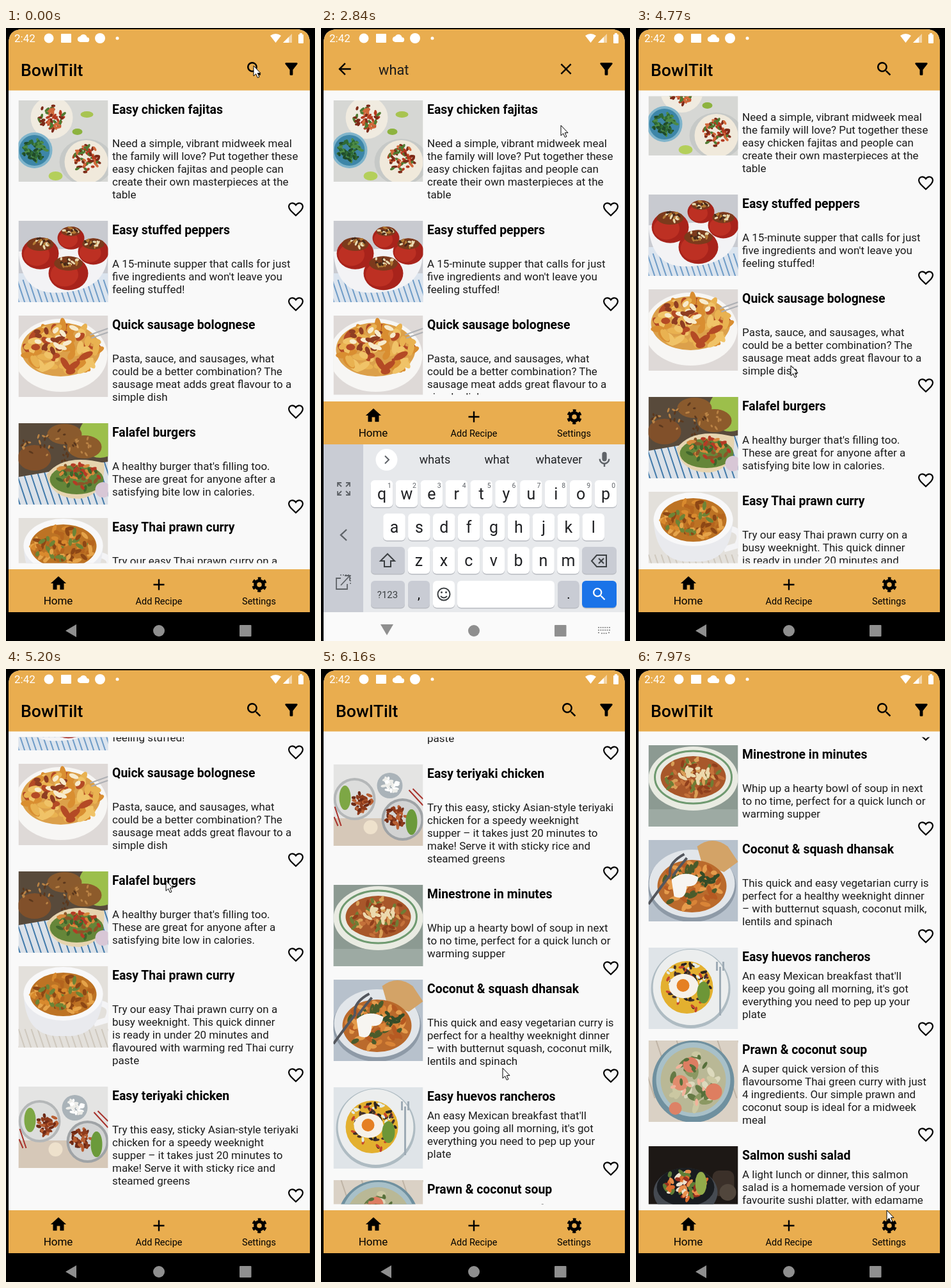
These frames come from a looping animation (483 px wide and 957 px high, 8 s). An HTML page:

```html
<!DOCTYPE html>
<html lang="en">
<head>
<meta charset="utf-8">
<title>Recipes</title>
<style>
html, body { margin: 0; width: 100%; height: 100%; overflow: hidden; background: #000; }
svg { display: block; font-family: Roboto, sans-serif; }
text { white-space: pre; }
</style>
</head>
<body>
<svg id="stage" width="483" height="957" viewBox="0 0 483 957"></svg>
<script>
const ORANGE = '#e9ad4f';
const ICONS = {
  search: 'M15.5 14h-.8l-.3-.3A6.5 6.5 0 1 0 13.7 14.4l.3.3v.8l5 5L20.5 19zm-6 0a4.5 4.5 0 1 1 0-9 4.5 4.5 0 0 1 0 9z',
  home: 'M10 20v-6h4v6h5v-8h3L12 3 2 12h3v8z',
  add: 'M19 13h-6v6h-2v-6H5v-2h6V5h2v6h6z',
  filter: 'M4.2 5.6 10 13v6q0 1 1 1h2q1 0 1-1v-6l5.8-7.4A1 1 0 0 0 19 4H5a1 1 0 0 0-.8 1.6z',
  back: 'M20 11H7.8l5.6-5.6L12 4l-8 8 8 8 1.4-1.4L7.8 13H20z',
  close: 'M19 6.4 17.6 5 12 10.6 6.4 5 5 6.4 10.6 12 5 17.6 6.4 19 12 13.4 17.6 19 19 17.6 13.4 12z',
  mic: 'M12 14a3 3 0 0 0 3-3V5a3 3 0 0 0-6 0v6a3 3 0 0 0 3 3zm5-3a5 5 0 0 1-10 0H5a7 7 0 0 0 6 6.9V21h2v-3.1A7 7 0 0 0 19 11z',
  cloud: 'M19.4 10A7.5 7.5 0 0 0 5.4 8 6 6 0 0 0 6 20h13a5 5 0 0 0 .4-10z',
  heart: 'M12 20C6 14.6 3 11.9 3 8.5 3 6 5 4 7.5 4c1.8 0 3.5 1 4.5 2.6C13 5 14.7 4 16.5 4 19 4 21 6 21 8.5c0 3.4-3 6.1-9 11.5z'
};

// SVG string helpers
const rect = (x, y, w, h, fill, r = 0) => `<rect x="${x}" y="${y}" width="${w}" height="${h}" rx="${r}" fill="${fill}"/>`;
const oval = (x, y, rx, ry, fill) => `<ellipse cx="${x}" cy="${y}" rx="${rx}" ry="${ry}" fill="${fill}"/>`;
const dot = (x, y, r, fill) => oval(x, y, r, r, fill);
const shape = (d, fill) => `<path d="${d}" fill="${fill}"/>`;
const line = (d, color, w = 2) => `<path d="${d}" fill="none" stroke="${color}" stroke-width="${w}"/>`;
const text = (x, y, size, str, more = '') => `<text x="${x}" y="${y}" font-size="${size}" ${more}>${str.replace(/&/g, '&amp;')}</text>`;
const mid = (x, y, size, str, more = '') => text(x, y, size, str, 'text-anchor="middle" ' + more);
const group = (id, body, more = '') => `<g id="${id}" ${more}>${body}</g>`;
const icon = (name, x, y, fill = '#000', s = 1.214) =>
  `<path transform="translate(${x} ${y}) scale(${s}) translate(-12 -12)" d="${ICONS[name]}" fill="${fill}"/>`;

// Scattered food pieces inside an ellipse
function bits(seed, cx, cy, rx, ry, n, size, colors) {
  const pal = colors.split(' ');
  const rnd = () => (seed = (seed * 16807) % 2147483647) / 2147483647;
  let out = '';
  for (let i = 0; i < n; i++) {
    const a = rnd() * 6.283, d = Math.sqrt(rnd());
    const x = (cx + rx * d * Math.cos(a)).toFixed(1), y = (cy + ry * d * Math.sin(a)).toFixed(1);
    const turn = Math.floor(rnd() * 180);
    out += `<ellipse rx="${(size * (.7 + rnd() * .6)).toFixed(1)}" ry="${(size * .5).toFixed(1)}" fill="${pal[i % pal.length]}" transform="translate(${x} ${y}) rotate(${turn})"/>`;
  }
  return out;
}

const pepper = (x, y, r) => oval(x, y, r, r * .85, '#a8231b') + oval(x - r * .2, y + 2, r * .7, r * .6, '#bd3023') +
  oval(x, y - r * .5, r * .72, r * .36, '#7c3a1c') + bits(x + 7, x, y - r * .55, r * .55, r * .25, 16, 3.4, '#e8d9b0 #b27a35 #472a19');
const stripes = (y, n, w, color) => Array.from({ length: n }, (_, i) => line(`M${i * w - 20} ${y}l30 90`, color, 2)).join('');

const PHOTOS = [
  () => rect(0, 0, 140, 127, '#d6d7d4') + dot(52, 27, 33, '#f0ebe0') + bits(5, 52, 27, 22, 20, 55, 4, '#b4391f #d2683a #7d2a17 #4f7a31') +
    dot(25, 78, 28, '#7fb4cb') + dot(25, 78, 24, '#3d86a8') + bits(9, 25, 78, 18, 17, 60, 4, '#2e6a35 #4c8a45 #1f4b2a') +
    oval(106, 96, 42, 36, '#c6c9c7') + dot(106, 96, 34, '#f0e9db') + bits(3, 107, 92, 21, 22, 60, 4, '#b4391f #d2683a #7d2a17 #4f7a31') +
    oval(107, 22, 10, 5, '#a8c451') + oval(92, 49, 8, 5, '#8db33f') + oval(58, 118, 11, 7, '#b4cf5b'),
  () => rect(0, 0, 140, 127, '#c8cad0') + rect(0, 82, 140, 45, '#dbe4ee') + stripes(92, 20, 9, '#6f9cc7') +
    shape('M0 48Q4 108 50 112Q98 114 122 94Q144 72 138 40Z', '#f3f3f5') + pepper(82, 27, 21) + pepper(117, 48, 24) + pepper(34, 51, 29) + pepper(78, 82, 31),
  () => rect(0, 0, 140, 127, '#ded9d7') + oval(66, 62, 73, 57, '#f7f6f4') + oval(66, 53, 62, 42, '#dca04a') +
    bits(4, 66, 53, 58, 39, 80, 10, '#e9b251 #d98e31 #b44a25 #f0c368') + bits(8, 56, 34, 40, 24, 20, 7, '#f7ebcd #8f3d22') + line('M112 30l28-10M114 35l26-9', '#aeb0b4', 2),
  () => rect(0, 0, 140, 127, '#dbe1e8') + stripes(60, 18, 11, '#427aaa') + shape('M0 0h140v60L0 84Z', '#584a3b') +
    dot(128, 20, 34, '#9cbf4b') + oval(72, 17, 27, 16, '#8a5a2d') + oval(25, 54, 26, 20, '#81502a') + oval(103, 37, 27, 18, '#8d5b2b') +
    bits(6, 60, 36, 56, 26, 45, 3, '#b98244 #5b381d') + shape('M44 80Q70 46 134 62Q136 112 96 118Q50 118 44 80Z', '#e6d4af') +
    oval(91, 88, 42, 23, '#658639') + bits(7, 91, 84, 36, 20, 55, 5, '#b53a25 #8a5628 #d5893c #3f662b') + dot(132, 104, 12, '#d8c7d6'),
  () => rect(0, 0, 140, 127, '#e3e0db') + stripes(98, 18, 10, '#cfc8be') + line('M128 58q22 4 10 26l-20 6', '#f4f4f6', 9) +
    shape('M8 42Q10 106 58 109H82Q130 106 132 42Z', '#e9eaee') + oval(70, 43, 62, 42, '#f8f8f9') + oval(70, 44, 52, 34, '#bd7324') +
    bits(2, 70, 44, 47, 30, 85, 6, '#d98a2e #b5651e #e5a349 #8d4715 #6d8436'),
  () => rect(0, 0, 140, 127, '#e4e4e3') + rect(0, 84, 140, 43, '#d6c8b8') + dot(33, 54, 33, '#b4b7b8') + dot(33, 54, 29, '#dcdddc') +
    dot(108, 86, 33, '#9fa3a6') + dot(108, 86, 29, '#d2d3d3') + dot(88, 33, 20, '#aab3b9') + bits(4, 88, 32, 13, 12, 30, 4, '#fff #eeeeea') +
    bits(8, 43, 58, 17, 16, 40, 4.5, '#8e3b1c #b85e32 #6e2a15') + bits(9, 98, 82, 16, 16, 40, 4.5, '#8e3b1c #b85e32 #6e2a15') +
    oval(18, 52, 9, 19, '#7da745') + oval(122, 90, 9, 20, '#6b9a3b') + dot(58, 98, 11, '#eee1cc') + line('M2 66l10 30M1 82l6 14M118 40l22 24M124 38l16 16', '#a8322c', 2),
  () => rect(0, 0, 140, 127, '#8c9a92') + rect(0, 100, 140, 27, '#9daaa3') + oval(70, 52, 70, 50, '#e9ebe2') +
    `<ellipse cx="70" cy="50" rx="60" ry="41" fill="none" stroke="#6f9a70" stroke-width="3"/>` + oval(70, 50, 51, 33, '#a8572a') +
    bits(5, 70, 50, 47, 29, 85, 5, '#c4713a #8f3f1c #d99f57 #6f7d35') + bits(6, 72, 46, 24, 14, 24, 5, '#ecd9ad'),
  () => rect(0, 0, 140, 127, '#b7c1cc') + oval(68, 72, 69, 56, '#8e9aa7') + oval(68, 68, 67, 53, '#e2e6ea') + shape('M76 10Q100-8 124 10L140 34 118 50 84 38Z', '#d3a367') +
    oval(68, 72, 54, 41, '#ba6a2c') + bits(3, 68, 72, 48, 36, 75, 7, '#d98437 #b65a22 #e59c4c #4a5b2b') + bits(5, 88, 56, 24, 13, 14, 5, '#354c28') +
    shape('M36 62q18-16 42-4q-2 16-18 14q-2 24-20 16z', '#f7f5f1') + line('M0 100L34 54M34 54q-4-18 22-32M38 56q10-14 22-28', '#53565d', 4),
  () => rect(0, 0, 140, 127, '#dfe4e8') + dot(66, 64, 62, '#aebbc2') + dot(66, 62, 59, '#eceeee') + dot(60, 62, 41, '#e3b02f') +
    bits(7, 60, 62, 38, 38, 75, 4, '#2c2420 #43302b #e4ece6 #c4452a') + oval(55, 60, 23, 19, '#f6f1e8') + dot(54, 59, 10, '#e58023') +
    oval(86, 70, 10, 17, '#6d9637') + line('M112 30v76M107 22v14M117 22v14', '#9eabb5', 3),
  () => rect(0, 0, 140, 127, '#dad1c5') + stripes(0, 6, 32, '#bfb4a5') + dot(70, 64, 64, '#6f909f') + dot(70, 61, 58, '#a8c0c8') + dot(70, 62, 51, '#b9b896') +
    bits(5, 70, 62, 44, 44, 32, 9, '#dcd9bd #8b9862 #cbc8a2 #657a45') + dot(66, 38, 12, '#dd7d62') + dot(102, 80, 13, '#de7e60') + dot(50, 66, 12, '#e18c6e') + dot(42, 106, 10, '#dd8266') +
    bits(9, 70, 62, 34, 38, 16, 5, '#f2b39b #566f3a'),
  () => rect(0, 0, 140, 127, '#1d1815') + rect(100, 38, 34, 40, '#3b3029', 10) + dot(124, 72, 13, '#51463c') + oval(58, 72, 50, 38, '#454a51') + oval(58, 64, 45, 30, '#191c20') +
    bits(5, 58, 60, 36, 22, 60, 6, '#dd6b2c #e98e4b #ede3cf #5e7e36 #97301e') + oval(82, 58, 9, 18, '#92ab4a')
];

// title, gap from title to body, body lines
const RECIPES = [
  ['Easy chicken fajitas', 53, 'Need a simple, vibrant midweek meal|the family will love? Put together these|easy chicken fajitas and people can|create their own masterpieces at the|table'],
  ['Easy stuffed peppers', 53, "A 15-minute supper that calls for just|five ingredients and won't leave you|feeling stuffed!"],
  ['Quick sausage bolognese', 53, 'Pasta, sauce, and sausages, what|could be a better combination? The|sausage meat adds great flavour to a|simple dish'],
  ['Falafel burgers', 53, "A healthy burger that's filling too.|These are great for anyone after a|satisfying bite low in calories."],
  ['Easy Thai prawn curry', 53, 'Try our easy Thai prawn curry on a|busy weeknight. This quick dinner|is ready in under 20 minutes and|flavoured with warming red Thai curry|paste'],
  ['Easy teriyaki chicken', 53, 'Try this easy, sticky Asian-style teriyaki|chicken for a speedy weeknight|supper – it takes just 20 minutes to|make! Serve it with sticky rice and|steamed greens'],
  ['Minestrone in minutes', 53, 'Whip up a hearty bowl of soup in next|to no time, perfect for a quick lunch or|warming supper'],
  ['Coconut & squash dhansak', 53, 'This quick and easy vegetarian curry is|perfect for a healthy weeknight dinner|– with butternut squash, coconut milk,|lentils and spinach'],
  ['Easy huevos rancheros', 30, "An easy Mexican breakfast that'll|keep you going all morning, it's got|everything you need to pep up your|plate"],
  ['Prawn & coconut soup', 30, 'A super quick version of this|flavoursome Thai green curry with just|4 ingredients. Our simple prawn and|coconut soup is ideal for a midweek|meal'],
  ['Salmon sushi salad', 30, 'A light lunch or dinner, this salmon|salad is a homemade version of your|favourite sushi platter, with edamame|beans']
];

function recipeRows() {
  let y = 127, out = '';
  RECIPES.forEach(([title, gap, body], i) => {
    const lines = body.split('|');
    const heartY = y + gap + 20 * lines.length + 3;
    out += `<g transform="translate(19.5 ${y - 14})" clip-path="url(#thumb)">${PHOTOS[i]()}</g>`;
    out += text(166, y + 6.5, 19.4, title, 'font-weight="700"');
    lines.forEach((s, k) => out += text(166, y + gap + 6 + 20 * k, 17, s, 'fill="#1c1c1c"'));
    out += `<path transform="translate(453 ${heartY}) scale(1.214) translate(-12 -12)" d="${ICONS.heart}" fill="none" stroke="#000" stroke-width="1.8"/>`;
    y = heartY + 32;
  });
  return out;
}

function statusBar() {
  return text(13, 22, 17, '2:42') + dot(67, 16, 7.5, '#fff') + rect(86, 9, 16, 14, '#fff', 1) + icon('cloud', 121, 16, '#fff', .75) +
    dot(147, 16, 8, '#fff') + dot(174, 16, 2.5, '#fff') + shape('M413 12q8.5-6 17 0l-8.5 11z', '#fff') +
    shape('M433 23l14-14v14z', '#ffffff80') + shape('M433 23l9-9v9z', '#fff') + rect(457, 10, 8, 14, '#fff', 1) + rect(459, 8, 4, 3, '#fff');
}

function appNav() {
  const gear = `<circle cx="396" cy="869" r="6.3" fill="none" stroke="#000" stroke-width="5"/>` +
    `<circle cx="396" cy="869" r="9.7" fill="none" stroke="#000" stroke-width="4" stroke-dasharray="5.08" stroke-dashoffset="2.54" transform="rotate(-90 396 869)"/>`;
  return rect(4, 845, 471, 67, ORANGE) + icon('home', 82, 867) + icon('add', 239, 869) + gear +
    mid(81.5, 900, 17, 'Home') + mid(239, 900, 14.5, 'Add Recipe') + mid(395.5, 900, 14.5, 'Settings');
}

function keyboard() {
  const PITCH = 38.9, GRAY = '#c9ccd4', INK = '#5f6368';
  const key = (x, y, w, fill = '#fff') => rect(x, y + 1.5, w, 42, '#b9bcc2', 6) + rect(x, y, w, 42, fill, 6);
  let out = rect(4, 650, 471, 307, '#e7e9ec') + rect(4, 650, 62, 307, GRAY);
  out += line('M26 716v-6h6M39 710h6v6M45 723v6h-6M32 729h-6v-6M26 710l6 6M45 710l-6 6M45 729l-6-6M26 729l6-6', INK, 1.8);
  out += line('M40 783l-9 8.5 9 8.5', INK, 2.4) + line('M31 859h-7v17h17v-8M31 870l14-15M37 855h8v8', INK, 1.8) +
    `<path d="M30 854h16v16" fill="none" stroke="${INK}" stroke-width="1.5" stroke-dasharray="2 2"/>`;

  ['qwertyuiop', 'asdfghjkl', 'zxcvbnm'].forEach((row, r) => {
    const x0 = [95, 114.5, 153][r], y = [706, 758, 810][r];
    [...row].forEach((ch, i) => {
      const x = x0 + i * PITCH;
      out += key(x - 17.3, y, 34.6) + mid(x, y + 29.5, 25, ch, 'fill="#202124"');
      if (!r) out += mid(x + 12, y + 11.5, 10.5, String((i + 1) % 10), `fill="${INK}"`);
    });
  });
  out += key(78, 810, 53, GRAY) + line('M104 821l-11 11h6v9h10v-9h6z', '#3c4043') + key(408, 810, 54, GRAY) +
    line('M431 823h15v18h-15l-8-9zM434 828l8 8M442 828l-8 8', '#3c4043');
  out += key(78, 863, 53, GRAY) + mid(104, 890, 15, '?123', 'fill="#3c4043"') + key(136, 863, 34, GRAY) + mid(153, 891, 20, ',') +
    key(175, 863, 34) + `<circle cx="192" cy="884" r="9.5" fill="none" stroke="#3c4043" stroke-width="2"/>` +
    dot(188.5, 881, 1.5, '#3c4043') + dot(195.5, 881, 1.5, '#3c4043') + line('M187 887q5 5 10 0', '#3c4043') +
    key(213, 863, 152) + key(370, 863, 33.5, GRAY) + mid(387, 891, 20, '.') + key(408, 863, 54, '#1a73e8') + icon('search', 435, 884, '#fff', 1.1);

  const tools = line('M105 668l-6 6 6 6', INK) + icon('search', 152, 675, INK) +
    line('M198 665h18v12l-6 6h-12zM216 677h-6v6M203 675q4 4 8 0', INK) + dot(203, 671, 1.3, INK) + dot(211, 671, 1.3, INK) +
    mid(261, 680, 17, 'GIF', `fill="${INK}" font-weight="900"`) + line('M309 666h17v18h-17zM313 667v-3h9v3M313 673h9M313 677h6', INK) +
    line('M352.5 662v25', '#d0d2d6', 1) + dot(380, 674, 2.6, INK) + dot(388, 674, 2.6, INK) + dot(396, 674, 2.6, INK);
  const words = line('M100 668l6 6-6 6', INK) + [178, 275, 372].map(x => mid(x, 680, 18, '', 'class="word" fill="#202124"')).join('');
  return out + dot(102.5, 674, 17, '#fff') + group('tools', tools) + group('words', words) + icon('mic', 443, 674, INK);
}

const darkNav = shape('M93 941l17-10v20z', '#8f8f8f');
const lightNav = rect(4, 912, 471, 45, '#fafafa') + shape('M93 931h20l-10 17z', '#8f8f8f') +
  `<path d="M433 936h19M433 940h19M433 944h3m13 0h3M438 945h9" stroke="#9a9a9a" stroke-width="2" stroke-dasharray="2 1.4"/>`;

const stage = document.getElementById('stage');
stage.innerHTML = `<defs><clipPath id="thumb"><rect width="140" height="127"/></clipPath>
  <clipPath id="view"><rect id="viewBoxRect" x="4" y="106.5" width="471" height="729"/></clipPath>
  <clipPath id="screen"><path d="M4 957V24Q4 2 26 2H453Q475 2 475 24V957z"/></clipPath></defs>` +
  rect(0, 0, 483, 957, '#000') +
  group('phone',
    rect(4, 0, 471, 912, '#f9f9f9') +
    `<g clip-path="url(#view)">${group('rows', recipeRows())}</g>` +
    group('nav', appNav()) +
    rect(4, 0, 471, 97.5, ORANGE) + `<g fill="#fff">${statusBar()}</g>` + icon('filter', 446, 64) +
    group('titleBar', text(23, 74.5, 26.7, 'BowlTilt', 'font-weight="500"') + icon('search', 388, 64)) +
    group('searchBar', icon('back', 37, 64) + text(90, 73, 21.8, '', 'id="query" fill="#1c1c1c"') + group('clear', icon('close', 383, 64))) +
    group('keys', keyboard()) + group('lightNav', lightNav) + group('darkNav', darkNav) +
    dot(239, 941, 9, '#8f8f8f') + rect(365, 932, 18.5, 18, '#8f8f8f', 1),
    'clip-path="url(#screen)"') +
  group('mouse', '<path d="M0 0v16l3.7-3.4 2.6 6 2.6-1.1-2.6-5.9H11z" fill="#fff" stroke="#000" stroke-width="1"/>');

const el = id => document.getElementById(id);
const wordEls = document.querySelectorAll('.word');
const show = (id, on) => el(id).setAttribute('display', on ? 'inline' : 'none');
const move = (id, x, y) => el(id).setAttribute('transform', `translate(${x} ${y})`);

const LOOP = 8000;
// The picture updates in runs: first time, last time, updates
const RUNS = [[290, 710, 4], [1460, 1760, 3], [2080, 2080, 1], [2380, 2380, 1], [2840, 3810, 8], [3960, 4500, 5],
  [4770, 5660, 7], [5780, 5780, 1], [5900, 6160, 3], [6296, 6840, 5], [6970, 7970, 8]];
const TYPED = [[1460, 'w', ''], [1610, 'w', 'we what was'], [1760, 'wh', 'who what when'], [2080, 'wha', 'what wha whale'], [2380, 'what', 'whats what whatever']];
const MOUSE = [[0, 387, 59], [290, 387, 59], [710, 375, 152], [2840, 375, 152], [3660, 35, 62], [3960, 35, 62], [4500, 241, 568],
  [4770, 242, 527], [5065, 250, 330], [5660, 269, 463], [6160, 284, 623], [6840, 290, 480], [7300, 305, 560], [7970, 392, 845]];
const SCROLL = [[4500, 0], [4770, 41], [5065, 300], [5362, 530], [5660, 660], [5900, 740], [6160, 804], [6432, 830], [6840, 940], [7500, 1012], [7970, 1022]];
// keyboard: time, drop, opacity
const KEYS = [[290, 262, 0], [430, 104, .3], [570, 25, .8], [710, 0, 1], [3660, 0, 1], [3810, 104, .3], [3960, 210, .06], [4095, 262, 0]];

function snap(t) {
  let last = 0;
  for (const [a, b, n] of RUNS) {
    if (t < a) break;
    const gap = n > 1 ? (b - a) / (n - 1) : 1;
    last = a + gap * Math.min(n - 1, Math.floor((t - a) / gap + 1e-6));
  }
  return last;
}

function sample(keys, t) {
  const i = keys.findIndex(k => k[0] > t);
  if (i < 0) return keys[keys.length - 1].slice(1);
  if (!i) return keys[0].slice(1);
  const a = keys[i - 1], b = keys[i], p = (t - a[0]) / (b[0] - a[0]);
  return a.slice(1).map((v, k) => v + (b[k + 1] - v) * p);
}

function draw(time) {
  const t = snap(time);
  const searching = t >= 290 && t < 3800;
  const raised = t >= 705 && t < 3800;
  const typed = TYPED.filter(k => t >= k[0]).pop() || [0, '', ''];
  const [drop, alpha] = sample(KEYS, t);

  move('mouse', ...sample(MOUSE, t));
  move('rows', 0, -Math.round(sample(SCROLL, t)[0]));
  move('nav', 0, raised ? -262 : 0);
  el('viewBoxRect').setAttribute('height', raised ? 466 : 729);
  show('titleBar', !searching);
  show('searchBar', searching);
  show('clear', searching && typed[1]);
  el('query').textContent = typed[1];

  move('keys', 0, drop);
  el('keys').setAttribute('opacity', alpha);
  show('keys', alpha > 0);
  show('tools', !typed[2]);
  show('words', typed[2]);
  const words = typed[2].split(' ');
  wordEls.forEach((w, i) => w.textContent = words[i] || '');
  show('lightNav', raised);
  show('darkNav', !raised);
}

const start = performance.now();
function tick() {
  draw((performance.now() - start) % LOOP);
  requestAnimationFrame(tick);
}
tick();
</script>
</body>
</html>
```
